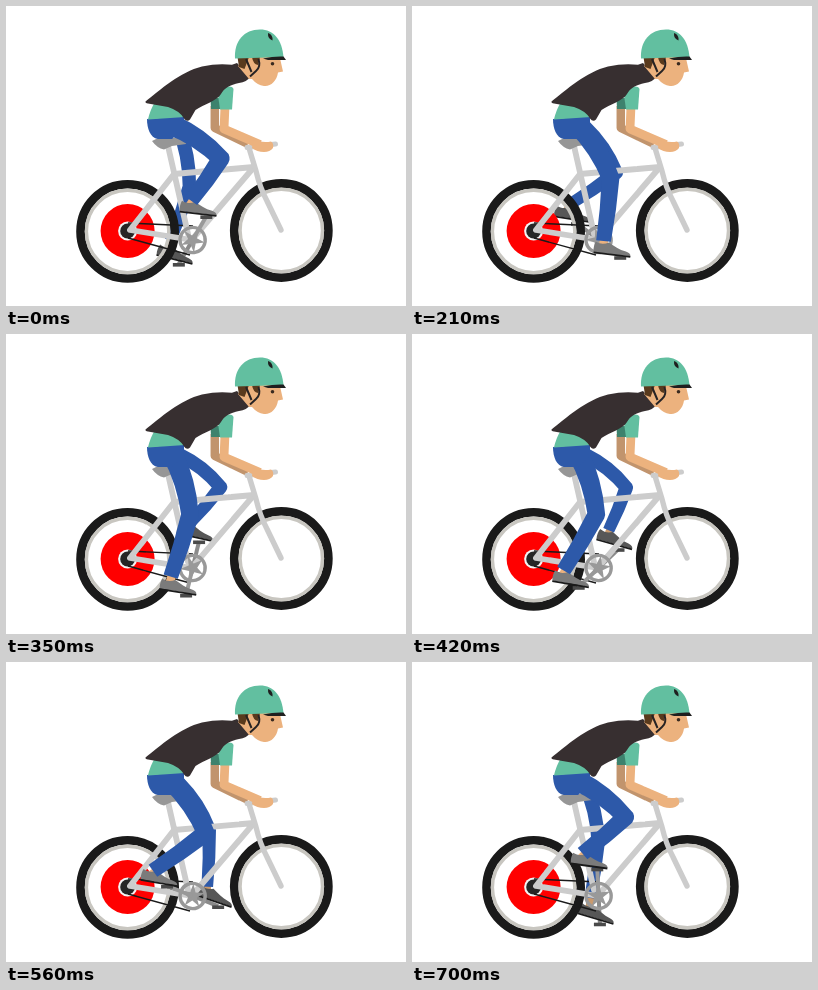
An HTML page for the animation above (0.77 s loop, 400 by 300 pixels).

```html
<!DOCTYPE html>
<html lang="en">
<head>
<meta charset="utf-8">
<title>Cyclist</title>
<style>
html, body { margin: 0; width: 100%; height: 100%; overflow: hidden; background: #fff; }
svg { display: block; width: 100%; height: 100%; }
</style>
</head>
<body>
<svg viewBox="0 0 400 300" fill="none">
  <defs>
    <g id="wheel">
      <circle r="47.1" stroke="#1a1a1a" stroke-width="8.6"/>
      <circle r="41.2" stroke="#c8c6c0" stroke-width="3.4"/>
    </g>
    <g id="shoe">
      <path d="M-27 -2 C-28 -6 -27 -10 -26 -12.5 C-21 -10 -17 -11 -13 -13 C-7 -10 -2 -7 5 -6 Q10 -5 10 -2 Z"/>
      <path d="M-27 -1.4 H10" stroke="#1a1a1a" stroke-width="1.8"/>
    </g>
  </defs>

  <g id="far">
    <path class="crank" stroke="#8a8a8a" stroke-width="4"/>
    <path class="pedal" stroke="#4a4a4a" stroke-width="3.6"/>
    <path class="skin" stroke="#c99a6e" stroke-width="7.5"/>
    <use class="shoe" href="#shoe" fill="#575757"/>
    <path class="leg" fill="#2d59a9"/>
  </g>

  <use href="#wheel" x="121.6" y="225.4"/>
  <use href="#wheel" x="275.3" y="224.5"/>
  <circle cx="121.6" cy="225" r="27" fill="#f00"/>
  <circle cx="121.6" cy="225" r="9.5" fill="#f4f4f4"/>
  <circle cx="121.6" cy="225" r="7.4" fill="#262626"/>
  <path d="M122 217 L187 220 M122 232 L184 249" stroke="#1a1a1a" stroke-width="1.4"/>

  <g stroke="#ccc" stroke-width="5.8" stroke-linecap="round" stroke-linejoin="round">
    <path d="M162 140 L182 228 M248 161 L189 230 M168 168 L248 161"/>
    <path d="M168 168 L124 224 L186 234"/>
    <path d="M243 142 L250 165 Q254 182 261 195 L275 224" stroke-width="5.4"/>
  </g>
  <path d="M146 135 L152 132 H177 Q182 135 180 138 L166 140 L158 143.5 Q151 142 146 135 Z" fill="#969696"/>

  <g id="ring">
    <circle r="12.6" stroke="#999" stroke-width="3.4"/>
    <path id="star" fill="#999"/>
  </g>

  <g id="near">
    <path class="crank" stroke="#999" stroke-width="4"/>
    <path class="pedal" stroke="#4a4a4a" stroke-width="3.6"/>
    <path class="skin" stroke="#ecb27e" stroke-width="8.5"/>
    <use class="shoe" href="#shoe" fill="#7b7b7b"/>
    <path class="leg" fill="#2d59a9"/>
  </g>
  <path d="M141 113 L178 110 V122 L166 133 H152 C144 132 141 122 141 113 Z" fill="#2d59a9"/>

  <g stroke-linejoin="round">
    <path d="M208.8 100 V122 L242 138" stroke="#c1946d" stroke-width="8.5"/>
    <path d="M204.5 92 H215 V103 H205 Z" fill="#3d826d"/>
    <path d="M241 141.5 L269.5 138" stroke="#ccc" stroke-width="5" stroke-linecap="round"/>
    <path d="M219 100 L218 123 L254 138.5" stroke="#ecb27e" stroke-width="8.8"/>
    <path d="M247 134 Q257 137 265 135.5 Q268 137 267 142 Q264 146 258 146 Q251 146 246 142 Z" fill="#ecb27e"/>
  </g>
  <path d="M149 96 L174 102 L179 111 L142 113.5 Q144 104 149 96 Z" fill="#62bfa0"/>
  <path d="M212 89 C217 81 225 78 227.5 83 L226 103.5 H214 Z" fill="#62bfa0"/>
  <path d="M139.5 95.5 C154 84 174 66 196 60.5 Q212 57 226 58.8 L231 57 L244 71 Q241 76 233 77 C224 79 218 82 215 88 C211 95 198 98 189.5 104 L184 113.5 Q181 116.5 178 112.5 Q174 105 162 101 L142 97.5 Q139 97 139.5 95.5 Z" fill="#372f30"/>

  <path d="M232 60 L242 50 H273.5 L277 65.5 L272 66.5 C271 75 264 81 258 80 Q251 79 246 73 L243 73 Z" fill="#ecb27e"/>
  <path d="M231.5 51 H243 L238.5 63 L233 61 Z M246 51 H254 L252 59 Q247 58 246 51 Z" fill="#593a1d"/>
  <path d="M240 53 L245.5 66 M252.5 53 Q255 61 250 65 L244 70.5" stroke="#272324" stroke-width="2"/>
  <circle cx="266.5" cy="57.8" r="1.8" fill="#3a2a20"/>
  <path d="M229 52.5 C228 35 238 23.5 254 23.5 C268 23.5 276 34 277.5 51 Z" fill="#62bfa0"/>
  <path d="M257 52.5 Q268 50 277.5 50.5 L280 54 H262 Z" fill="#1f1f1f"/>
  <path d="M262 27 Q267 28.5 266.5 34.5 Q261.5 32.5 262 27 Z" fill="#1f1f1f"/>
</svg>
<script>
const STEP = 70, STEPS = 11, TAU = Math.PI * 2, RAD = Math.PI / 180;
const axle = [186.6, 234], pivot = [158, 121];
const $ = s => document.querySelector(s);
const add = (p, x, y) => [p[0] + x, p[1] + y];
const polar = (p, r, a) => add(p, r * Math.cos(a), r * Math.sin(a));
const line = (p, q) => `M${p} L${q}`;

// Tapered limb from p to q, bowed forward, with an optional round end at q.
function limb(p, q, wp, wq, bow, round) {
  const a = Math.atan2(q[1] - p[1], q[0] - p[0]) + Math.PI / 2;
  const mid = [(p[0] + q[0]) / 2, (p[1] + q[1]) / 2];
  const bend = side => polar(mid, side * (wp + wq) / 2 - bow, a);
  const end = round ? `A${wq} ${wq} 0 0 0 ` : 'L';
  return `M${polar(p, wp, a)} Q${bend(1)} ${polar(q, wq, a)} ` +
    `${end}${polar(q, -wq, a)} Q${bend(-1)} ${polar(p, -wp, a)} Z`;
}

function makeSide(id, o) {
  const part = n => $(`#${id} .${n}`);
  const [crank, pedal, skin, shoe, leg] = ['crank', 'pedal', 'skin', 'shoe', 'leg'].map(part);
  const [wHip, wKnee, wCuff] = o.widths;
  return angle => {
    const a = angle + o.turn;
    const foot = polar(axle, 27.5, a);
    const tilt = o.tilt + o.swing * Math.cos(a - o.lag * RAD);
    const knee = polar(pivot, 65, (48 + 19 * Math.cos(a - 118 * RAD)) * RAD);
    const ankle = add(foot, ...o.ankle);
    const dx = ankle[0] - knee[0], dy = ankle[1] - knee[1];
    const dist = Math.hypot(dx, dy);
    const k = Math.min(dist - 3, o.shin) / dist;
    const cuff = add(knee, dx * k, dy * k);
    crank.setAttribute('d', line(axle, foot));
    pedal.setAttribute('d', line(add(foot, -6, 1), add(foot, 6, 1)));
    skin.setAttribute('d', line(knee, add(ankle, 0, 3)));
    shoe.setAttribute('transform', `translate(${add(foot, ...o.shift)}) rotate(${tilt})`);
    leg.setAttribute('d', limb(o.hip, knee, wHip, wKnee, 6, true) + limb(knee, cuff, wKnee, wCuff, 1.5));
  };
}

const sides = [
  makeSide('far', {
    turn: Math.PI, tilt: 14, swing: 5, lag: 30, hip: [172, 120], widths: [7, 6.8, 5.8],
    ankle: [-11, -16], shin: 57, shift: [3.5, -1]
  }),
  makeSide('near', {
    turn: 0, tilt: 8, swing: 2, lag: 170, hip: [166, 119], widths: [10.5, 8.8, 7.4],
    ankle: [-17, -13], shin: 65, shift: [0, 0]
  })
];

const starPoint = (_, i) => polar([0, 0], i % 2 ? 4.6 : 12.5, i * TAU / 10);
$('#star').setAttribute('d', `M${Array.from({ length: 10 }, starPoint).join('L')}Z`);

function draw(ms) {
  const step = Math.floor(ms / STEP) % STEPS;
  const angle = -60 * RAD + step * TAU / STEPS;
  sides.forEach(f => f(angle));
  $('#ring').setAttribute('transform', `translate(${axle}) rotate(${angle / RAD})`);
}

let start;
function tick(now) {
  start ??= now;
  draw(Math.max(0, now - start));
  requestAnimationFrame(tick);
}
draw(0);
requestAnimationFrame(tick);
</script>
</body>
</html>
```
